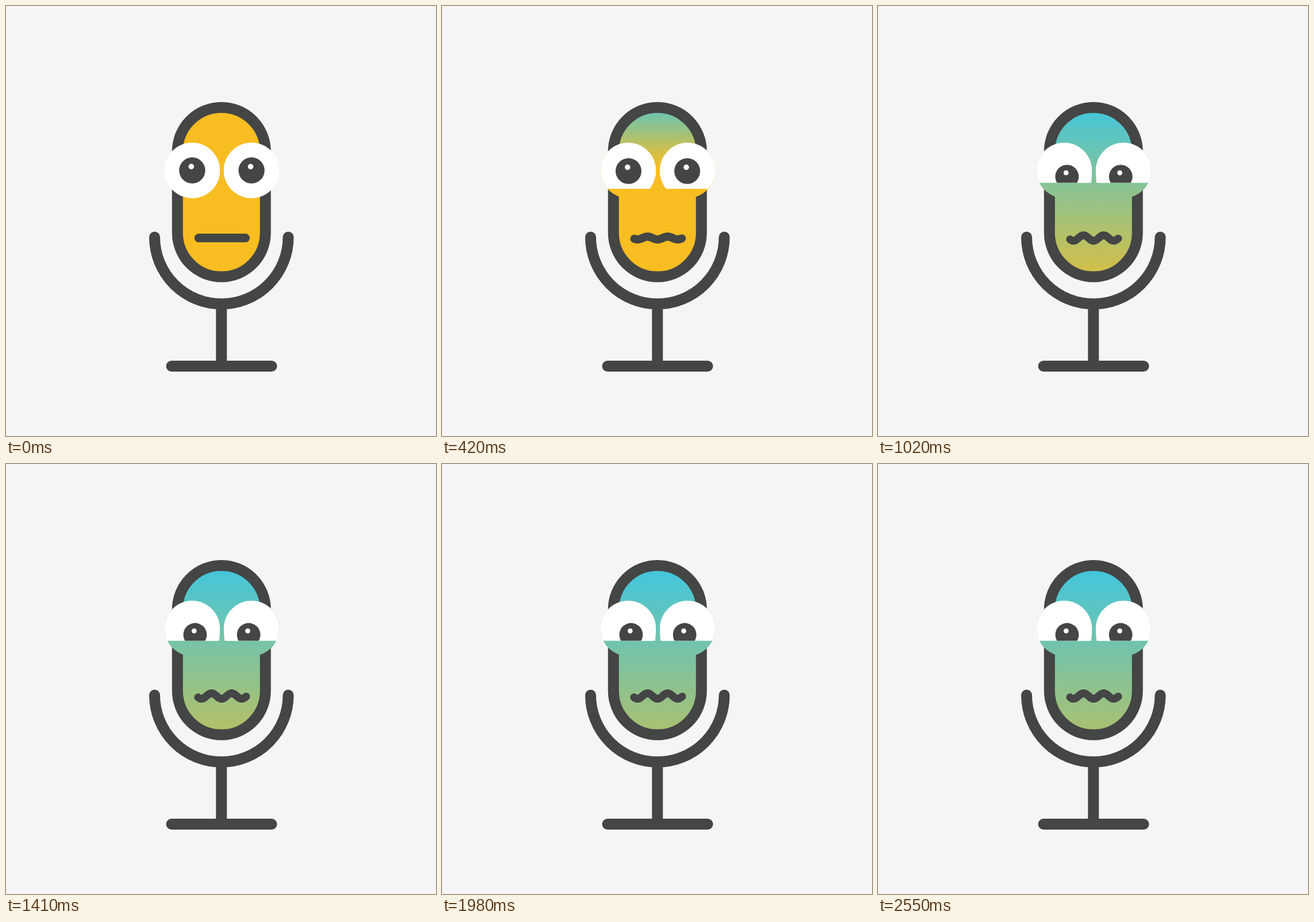
These frames come from a looping animation (748 by 748 pixels, 2580 ms). An HTML page with a canvas:

```html
<!DOCTYPE html>
<html lang="en">
<head>
<meta charset="utf-8">
<title>Microphone feeling cold</title>
<style>
  html, body { margin: 0; width: 100%; height: 100%; overflow: hidden; background: #f5f5f5; }
  canvas { display: block; }
</style>
</head>
<body>
<canvas id="stage" width="748" height="748"></canvas>
<script>
const ctx = document.getElementById('stage').getContext('2d');
const LOOP = 2580, DARK = '#444545', WARM = '#f8bd21', COLD = '#43c6dc';
const CENTER = 374.75, EYE_Y = 286, EYE_R = 48.2;

const mix = (a, b, p) => a + (b - a) * p;
const progress = (t, start, end) => Math.min(1, Math.max(0, (t - start) / (end - start)));
const easeInOut = u => u * u * (3 - 2 * u);
const easeOut = u => u * (2 - u);

function disc(x, y, r, fill) {
  ctx.beginPath();
  ctx.arc(x, y, r, 0, 2 * Math.PI);
  ctx.fillStyle = fill;
  ctx.fill();
}

function stroke(width, trace) {
  ctx.beginPath();
  trace();
  ctx.lineWidth = width;
  ctx.stroke();
}

function drawStand() {
  stroke(19, () => {
    ctx.arc(CENTER, 402, 116.25, Math.PI, 0, true);
    ctx.moveTo(CENTER, 518);
    ctx.lineTo(CENTER, 626.5);
    ctx.moveTo(288, 626.5);
    ctx.lineTo(462, 626.5);
  });
}

function bodyGradient(t) {
  const chill = easeOut(progress(t, 250, 1900));
  const gradient = ctx.createLinearGradient(0, mix(150, 185, chill), 0, mix(183, 676, chill));
  gradient.addColorStop(0, COLD);
  gradient.addColorStop(1, WARM);
  return gradient;
}

// side is -1 for the left eye and 1 for the right one
function drawEye(side, t, skin) {
  const x = 375.5 + side * 51.6;
  const lid = easeInOut(progress(t, 200, 580));
  const look = easeInOut(progress(t, 250, 1100));
  disc(x, EYE_Y, EYE_R, lid ? skin : '#fff');

  ctx.save();
  ctx.beginPath();
  ctx.rect(0, 0, 748, mix(335, 307.5, lid));
  ctx.clip();
  disc(x, EYE_Y, EYE_R, '#fff');
  // the inner lower quarter squares off as the lid rises
  ctx.save();
  ctx.beginPath();
  ctx.rect(side < 0 ? x : x - 50, EYE_Y, 50, 50);
  ctx.clip();
  ctx.beginPath();
  ctx.ellipse(x, EYE_Y, EYE_R, EYE_R + 48 * lid ** 6, 0, 0, 2 * Math.PI);
  ctx.fill();
  ctx.restore();

  const pupilX = x - side * 5 * look;
  const pupilY = mix(286, 297, look);
  disc(pupilX, pupilY, mix(22.7, 20.4, look), DARK);
  disc(pupilX - 1.6, pupilY - 6.6, mix(4.8, 4.3, look), '#fff');
  ctx.restore();
}

function drawMouth(t) {
  const shiver = easeInOut(progress(t, 200, 640));
  const left = mix(335.3, 334, shiver), right = mix(416.5, 417.8, shiver);
  stroke(mix(15, 13.5, shiver), () => {
    for (let x = left; x <= right; x += (right - left) / 80.001) {
      ctx.lineTo(x, 403.6 + 4.8 * shiver * Math.cos(2 * Math.PI * (x - 375) / 35));
    }
  });
}

function draw(t) {
  ctx.fillStyle = '#f5f5f5';
  ctx.fillRect(0, 0, 748, 748);
  ctx.strokeStyle = DARK;
  ctx.lineCap = ctx.lineJoin = 'round';
  drawStand();

  const skin = bodyGradient(t);
  ctx.fillStyle = skin;
  stroke(19, () => {
    ctx.roundRect(298.25, 176.5, 153, 294.5, 76.5);
    ctx.fill();
  });
  drawEye(-1, t, skin);
  drawEye(1, t, skin);
  drawMouth(t);
}

function tick() {
  draw(performance.now() % LOOP);
  requestAnimationFrame(tick);
}
tick();
</script>
</body>
</html>
```
